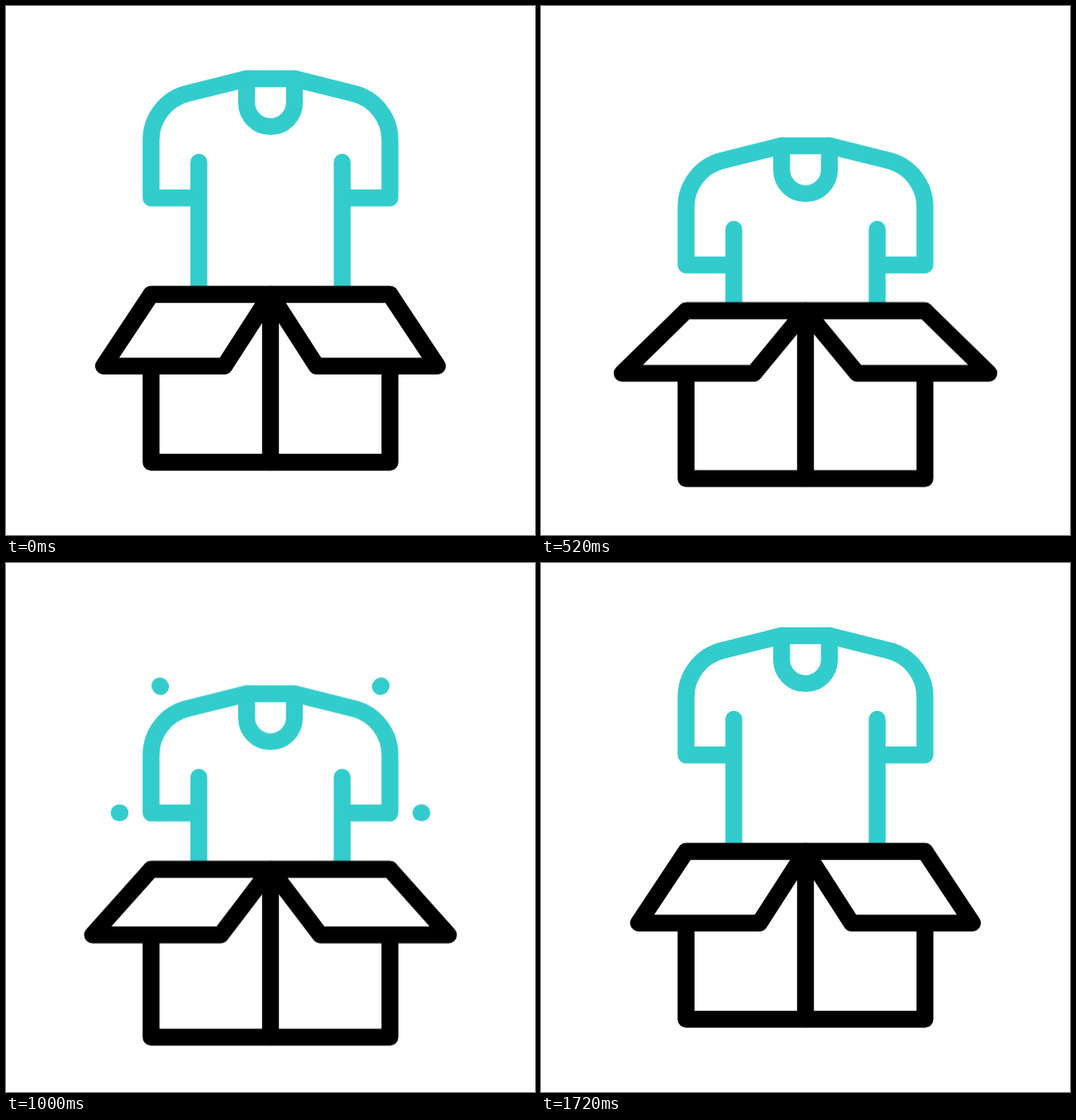
Animation of 640 by 640 pixels, one loop 1.76 s. Source, as an HTML page:

```html
<!DOCTYPE html>
<html lang="en">
<head>
<meta charset="utf-8">
<title>Shirt in a box</title>
<style>
  @property --head { syntax: "<length>"; inherits: true; initial-value: 0px; }
  @property --tail { syntax: "<length>"; inherits: true; initial-value: 0px; }

  html, body { margin: 0; width: 100%; height: 100%; overflow: hidden; background: #fff; }
  svg { display: block; width: 100%; height: 100%; }

  path {
    fill: none;
    stroke-width: 20.4;
    stroke-linecap: round;
    stroke-linejoin: round;
  }
  .shirt, .box, .flap, .rays {
    animation: 1760ms cubic-bezier(.5, 0, .5, 1) infinite;
  }
  .shirt { stroke: #33cccc; animation-name: dip; }
  .box { stroke: #000; animation-name: sink; }
  .box .body, .flap { fill: #fff; }
  .flap { animation-name: flap; }

  .rays { animation-name: head, tail, show; }
  .rays path {
    stroke-dasharray: calc(var(--head) - var(--tail)) 200px;
    stroke-dashoffset: calc(-1 * var(--tail));
  }

  @keyframes dip {
    0%, 5.28% { transform: translateY(0); }
    40.4% { transform: translateY(97.6px); animation-timing-function: cubic-bezier(.5, 0, .588, 1); }
    81.14%, 100% { transform: translateY(0); }
  }
  @keyframes sink {
    0%, 9.66% { transform: translateY(0); }
    40.34%, 46.02% { transform: translateY(25.5px); }
    83.07%, 100% { transform: translateY(0); }
  }
  /* Opens twice; the second time it settles with a long tail. */
  @keyframes flap {
    0%, 5.11%, 39.2%, 98.86%, 100% {
      d: path("M175.5 349 L118 435.6 L264.3 435.6 L320 349 Z");
    }
    23.01% {
      d: path("M175.5 349 L88.8 419.4 L254.5 419.4 L320 349 Z");
    }
    49.15% {
      d: path("M175.5 349 L88.8 419.4 L254.5 419.4 L320 349 Z");
      animation-timing-function: cubic-bezier(.01, 0, .01, 1);
    }
  }
  @keyframes head {
    0%, 54.43% { --head: 0px; }
    77.73%, 100% { --head: 100px; }
  }
  @keyframes tail {
    0%, 59.43% { --tail: 0px; }
    81.76%, 100% { --tail: 100px; }
  }
  @keyframes show {
    0%, 54.43% { opacity: 0; animation-timing-function: step-end; }
    54.44%, 81.75% { opacity: 1; animation-timing-function: step-end; }
    81.76%, 100% { opacity: 0; }
  }
</style>
</head>
<body>
<svg viewBox="0 0 640 640">
  <g class="shirt">
    <path d="M291.1 88 H348.9 V117 A28.9 28.9 0 0 1 291.1 117 Z"/>
    <path d="M291.1 88 L219.3 105.9 A57.8 57.8 0 0 0 175.5 162 V232.2 H233.3 M233.3 189 V400"/>
    <path d="M348.9 88 L420.7 105.9 A57.8 57.8 0 0 1 464.5 162 V232.2 H406.7 M406.7 189 V400"/>
    <g class="rays">
      <path pathLength="100" d="M138 232 H67.3"/>
      <path pathLength="100" d="M187 79.4 L139 19.9"/>
      <path pathLength="100" d="M502 232 H572.7"/>
      <path pathLength="100" d="M453 79.4 L501 19.9"/>
    </g>
  </g>
  <g class="box">
    <path class="body" d="M175.5 349 V552 H464.5 V349 Z"/>
    <path d="M320 349 V552"/>
    <path class="flap" d="M175.5 349 L118 435.6 L264.3 435.6 L320 349 Z"/>
    <g transform="translate(640 0) scale(-1 1)">
      <path class="flap" d="M175.5 349 L118 435.6 L264.3 435.6 L320 349 Z"/>
    </g>
  </g>
</svg>
</body>
</html>
```
